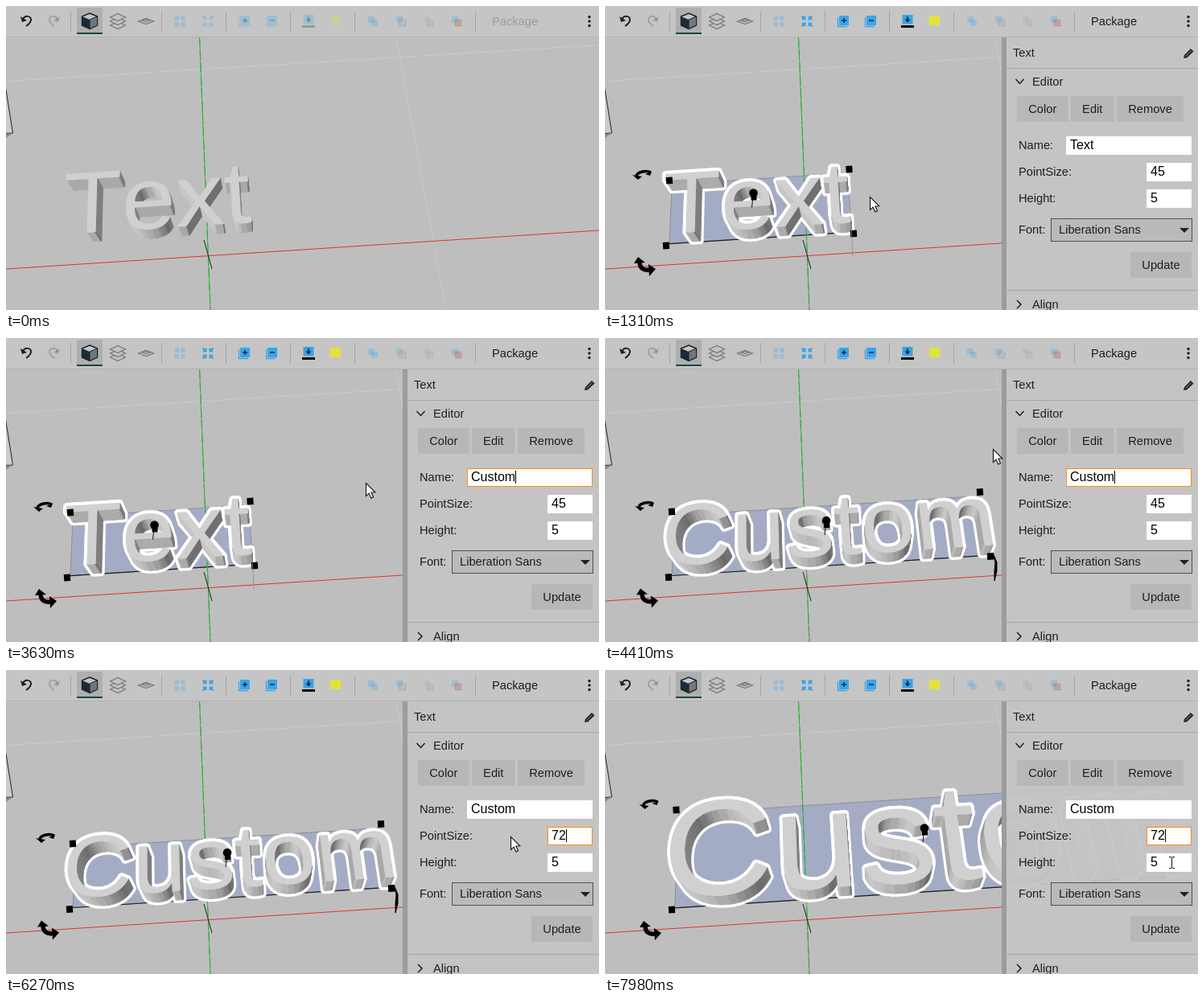
Write an HTML page with a canvas that moves like this. It is 737 px wide and 378 px high and loops after 8000 ms.

```html
<!DOCTYPE html>
<html lang="en">
<head>
<meta charset="utf-8">
<title>3D text editor</title>
<style>
html, body { margin: 0; width: 737px; height: 378px; overflow: hidden; background: #bebebe; }
canvas { display: block; }
</style>
</head>
<body>
<canvas id="stage" width="737" height="378"></canvas>
<script>
const W = 737, H = 378, LOOP = 8000, STEP = 78;
const FONT = '"Liberation Sans", Arial, sans-serif';
const INK = '#1e1e1e', BLUE = '#38a5ea', NADIR = [333, 620];
const g = document.getElementById('stage').getContext('2d');

function layer(w, h) {
  const c = document.createElement('canvas');
  c.width = w; c.height = h;
  return c.getContext('2d', { willReadFrequently: true });
}

function poly(c, pts, fill, stroke, width = 1, open) {
  c.beginPath();
  pts.forEach(([x, y], i) => i ? c.lineTo(x, y) : c.moveTo(x, y));
  if (!open) c.closePath();
  if (fill) { c.fillStyle = fill; c.fill(); }
  if (stroke) { c.strokeStyle = stroke; c.lineWidth = width; c.stroke(); }
}
const line = (c, x0, y0, x1, y1, color, width) => poly(c, [[x0, y0], [x1, y1]], null, color, width, true);
function rect(c, x0, y0, x1, y1, color) {
  c.fillStyle = color;
  c.fillRect(x0, y0, x1 - x0, y1 - y0);
}
function label(c, s, x, y, size = 14.67, color = INK) {
  c.font = `${size}px ${FONT}`;
  c.fillStyle = color;
  c.fillText(s, x, y);
}

// ---- solid lettering ----

// Ground plane in ems at 45 pt; z = 1 is the face of the letters.
function project(x, y, z) {
  const b = 0.055 * y, c = -0.033 * z, w = 1 + b + c;
  return [(251 + 120 * x + 167 * b + NADIR[0] * c) / w,
          (311 - 7.7 * x - 1720 * b + NADIR[1] * c) / w];
}

// Marching squares over rendered text; returns closed outlines in ems.
function trace(text) {
  const S = 120, pad = 6, base = 106, w = S * 4, h = 120;
  const c = layer(w, h);
  c.font = `${S}px ${FONT}`;
  c.fontKerning = 'none';
  c.fillText(text, pad, base);
  const data = c.getImageData(0, 0, w, h).data;
  const a = (x, y) => data[(y * w + x) * 4 + 3] - 127.5;
  const next = new Map(), at = new Map();
  for (let y = 0; y < h - 1; y++) for (let x = 0; x < w - 1; x++) {
    const q = [[x, y], [x + 1, y], [x + 1, y + 1], [x, y + 1]];
    const v = q.map(p => a(...p));
    if (v.every(n => n < 0) || v.every(n => n > 0)) continue;
    const id = [2 * (y * w + x), 2 * (y * w + x + 1) + 1, 2 * ((y + 1) * w + x), 2 * (y * w + x) + 1];
    for (let i = 0; i < 4; i++) {
      const n = (i + 1) % 4;
      if (v[i] > 0 || v[n] < 0) continue;
      let j = n;
      while (v[(j + 1) % 4] > 0) j = (j + 1) % 4;
      next.set(id[i], id[j]);
      const k = v[i] / (v[i] - v[n]);
      const px = q[i][0] + (q[n][0] - q[i][0]) * k + 0.5;
      const py = q[i][1] + (q[n][1] - q[i][1]) * k + 0.5;
      at.set(id[i], [(px - pad) / S, (base - py) / S]);
    }
  }
  const loops = [];
  while (next.size) {
    const loop = [];
    let k = next.keys().next().value;
    while (next.has(k)) {
      loop.push(at.get(k));
      const n = next.get(k);
      next.delete(k);
      k = n;
    }
    if (loop.length > 8) loops.push(loop);
  }
  return loops;
}

// Grey of a wall whose normal points along angle t (y up), in flat facets.
function shade(t) {
  const f = Math.PI / 20, r = Math.round(t / f) * f;
  const lit = Math.max(0, Math.cos(r + Math.PI * 0.75));
  const back = Math.max(0, Math.cos(r - Math.PI / 6));
  const v = Math.round(98 + 102 * lit + 34 * back);
  return `rgb(${v},${v},${v})`;
}

function makeSolid(text, size) {
  const em = size / 45, loops = trace(text);
  const place = (p, z) => project(-1.458 + p[0] * em, 0.246 + p[1] * em, z);
  const all = loops.flat(), xs = all.map(p => p[0]), ys = all.map(p => p[1]);
  const x0 = Math.min(...xs), x1 = Math.max(...xs), y0 = Math.min(...ys), y1 = Math.max(...ys);
  const quad = [[x0, y1], [x1, y1], [x1, y0], [x0, y0]].map(p => place(p, 0));
  const face = new Path2D(), hull = new Path2D(), walls = [];
  for (const loop of loops) {
    const n = loop.length;
    const front = loop.map(p => place(p, 1)), back = loop.map(p => place(p, 0));
    front.forEach((p, i) => i ? face.lineTo(...p) : face.moveTo(...p));
    face.closePath();
    for (let i = 0; i < n; i++) {
      const j = (i + 1) % n, s = loop[(i + n - 1) % n], e = loop[(i + 2) % n];
      const pts = [front[i], front[j], back[j], back[i]];
      pts.forEach((p, k) => k ? hull.lineTo(...p) : hull.moveTo(...p));
      hull.closePath();
      const nx = front[i][1] - front[j][1], ny = front[j][0] - front[i][0];
      if (nx * (NADIR[0] - front[i][0]) + ny * (NADIR[1] - front[i][1]) <= 0) continue;
      walls.push({
        pts,
        color: shade(Math.atan2(-(e[0] - s[0]), e[1] - s[1])),
        far: Math.hypot(front[i][0] - NADIR[0], front[i][1] - NADIR[1])
      });
    }
  }
  walls.sort((p, q) => q.far - p.far);
  return { quad, face, hull, walls };
}

function drawSolid(c, solid, outlined) {
  c.lineJoin = 'round';
  if (outlined) {
    c.strokeStyle = '#fff';
    c.lineWidth = 7.5;
    c.stroke(solid.hull);
    c.stroke(solid.face);
  }
  for (const w of solid.walls) poly(c, w.pts, w.color, w.color, 0.7);
  c.fillStyle = '#d0d0d0';
  c.fill(solid.face);
}

// ---- scene ----

function drawAxes(c) {
  line(c, 0, 327, W, 279, '#dc3434');
  line(c, 240.5, 38, 254, H, '#8f8a90');
  c.setLineDash([13, 3]);
  line(c, 240.5, 38, 254, H, '#00c80a');
  c.setLineDash([]);
  line(c, 246, 291, 256, 327, '#222');
}

function drawGround(c) {
  rect(c, 0, 0, W, H, '#bebebe');
  line(c, 0, 93.5, W, 48.5, '#c9c9c9');
  line(c, 484.5, 38, 547, H, '#c8c8c8');
  poly(c, [[-2, 92], [8.5, 158], [-2, 158.5]], '#cbcbcb', '#222');
  poly(c, [[0, 159], [8, 158.5], [0, 164]], '#8c8c8c');
}

function drawHandles(c, corners, knob) {
  for (const [x, y] of corners) {
    c.save();
    c.translate(x, y);
    c.rotate(-0.06);
    rect(c, -4, -4.3, 4, 4.3, '#000');
    c.restore();
  }
  const [kx, ky] = knob;
  line(c, kx, ky, kx - 2, ky + 18, '#111');
  c.fillStyle = '#000';
  c.beginPath();
  c.arc(kx, ky, 5.3, 0, 7);
  c.fill();
  rect(c, kx - 3, ky + 2, kx + 4, ky + 9, '#000');

  const [tx, ty] = corners[0], [bx, by] = corners[1];
  c.save();
  c.translate(tx - 34, ty - 7);
  c.lineWidth = 3.6;
  c.strokeStyle = '#000';
  c.beginPath();
  c.moveTo(11, -3);
  c.bezierCurveTo(5, -6, -5, -4, -7, 1);
  c.stroke();
  poly(c, [[-12, 0], [0, 2], [-5, 6]], '#000');
  poly(c, [[4, -1], [12, -4], [10, 1]], '#000');
  c.restore();
  c.save();
  c.translate(bx - 26, by + 26);
  c.lineWidth = 5.5;
  c.strokeStyle = '#000';
  c.beginPath();
  c.moveTo(-7, -6);
  c.bezierCurveTo(-7, 2, -2, 5, 5, 4);
  c.stroke();
  poly(c, [[-14, -4], [-9, -12], [0, -5]], '#000');
  poly(c, [[4, -3], [13, 3], [5, 12]], '#000');
  c.restore();
}

function makeScene(solid, corners, knob) {
  const c = layer(W, H);
  drawGround(c);
  if (corners) {
    const q = solid.quad;
    poly(c, q, '#a4acc5', '#8b8f9c');
    line(c, ...q[3], ...q[2], '#1c1c1c', 1.2);
  }
  drawAxes(c);
  drawSolid(c, solid, !!corners);
  if (corners) drawHandles(c, corners, knob);
  return c;
}

const shortText = makeSolid('Text', 45);
const scenes = {
  idle: makeScene(shortText),
  picked: makeScene(shortText, [[80, 217], [76, 298], [303.5, 203], [309, 283]], [184.5, 232.5]),
  renamed: makeScene(makeSolid('Custom', 45), [[83, 216], [79, 297.5], [466, 191.5], [479, 271.5]], [275, 227]),
  enlarged: makeScene(makeSolid('Custom', 72), [[88.5, 174], [83, 298]], [397, 196.5])
};
line(scenes.picked, 306, 270, 308, 312, '#8d8d8d', 0.8);
poly(scenes.renamed, [[482, 267], [487, 279], [487, 290], [484, 302], [484, 290], [485, 279]], '#000', '#000');

// ---- toolbar ----

function arrowBack(c, x, dir) {
  c.save();
  c.translate(x, 18);
  c.scale(dir, 1);
  c.strokeStyle = INK;
  c.lineWidth = 2;
  c.beginPath();
  c.moveTo(-4, -1);
  c.bezierCurveTo(-2, -7, 6, -6, 6, -1);
  c.bezierCurveTo(6, 3, 3, 5, 0, 7);
  c.stroke();
  poly(c, [[-7, -5], [-5, 2], [1, 0]], INK);
  c.restore();
}

function rhomb(c, x, y, rx, ry) {
  poly(c, [[x - rx, y], [x, y - ry], [x + rx, y], [x, y + ry]], '#c2c2c2', '#777', 1.2);
}

function makeBar(active) {
  const c = layer(W, 39);
  const on = active ? 1 : 0.28;
  const fade = (alpha, draw) => { c.globalAlpha = alpha; draw(); c.globalAlpha = 1; };
  rect(c, 0, 0, W, 38, '#c5c5c5');
  rect(c, 0, 38, W, 39, '#b2b2b2');
  for (const x of [80, 193, 273, 353, 433, 583]) rect(c, x, 6, x + 1, 32, '#a6a6a6');
  arrowBack(c, 25, 1);
  fade(0.22, () => arrowBack(c, 60, -1));

  rect(c, 88, 2, 120, 33, '#afafaf');
  rect(c, 88, 33, 120, 35, '#174a3c');
  poly(c, [[104, 9], [113.5, 13], [113.5, 24], [104, 28.5], [94.5, 24], [94.5, 13]], '#c2c5c8', '#17212b', 1.4);
  poly(c, [[94.5, 13], [104, 17], [104, 28.5], [94.5, 24]], '#1d2a38');
  poly(c, [[104, 17], [113.5, 13], [113.5, 24], [104, 28.5]], '#71777d', '#17212b');

  for (const y of [24, 19, 14]) rhomb(c, 139, y, 9.5, 4.5);
  rhomb(c, 174, 19, 9.5, 3.5);
  rhomb(c, 174, 18, 4.5, 1.5);

  const tiles = (x, r) => {
    for (const dx of [-1, 1]) for (const dy of [-1, 1])
      rect(c, x + dx * 3.8 - r, 19 + dy * 3.8 - r, x + dx * 3.8 + r, 19 + dy * 3.8 + r, BLUE);
  };
  fade(0.3, () => tiles(216, 2.8));
  fade(on, () => {
    tiles(251, 2.3);
    for (const dx of [-6, 6]) for (const dy of [-6, 6]) rect(c, 250.5 + dx, 18.5 + dy, 251.5 + dx, 19.5 + dy, '#444');
    for (const x of [296, 330]) {
      poly(c, [[x - 6.5, 14], [x - 6.5, 25.5], [x + 5, 25.5]], null, BLUE, 1.3, true);
      rect(c, x - 5, 12, x + 7, 24, BLUE);
      rect(c, x - 2, 17.3, x + 4, 18.7, '#123');
    }
    rect(c, 296.3, 15, 297.7, 21, '#123');
    rect(c, 369.5, 11, 382.5, 22.5, BLUE);
    line(c, 376, 13, 376, 18, '#123', 1.6);
    poly(c, [[372.5, 16.5], [379.5, 16.5], [376, 20.5]], '#123');
    rect(c, 403, 12, 416, 24, '#e2e23c');
  });
  rect(c, 368, 24, 384, 27, active ? '#000' : '#8fa08e');

  fade(0.28, () => {
    [456, 491, 525, 560].forEach((x, i) => {
      rect(c, x - 6, 13, x + 2, 21, i === 2 ? '#aaa' : BLUE);
      rect(c, x - 2, 17, x + 6, 25, i === 3 ? '#d8442a' : i ? '#a0a8ae' : BLUE);
      if (i) poly(c, [[x - 2, 17], [x + 6, 17], [x + 6, 25], [x - 2, 25]], null, i === 2 ? '#b96' : '#678');
    });
  });

  label(c, 'Package', 604, 24, 14.67, active ? INK : '#9b9b9b');
  c.fillStyle = INK;
  for (const y of [13.5, 19, 24.5]) { c.beginPath(); c.arc(725, y, 1.7, 0, 7); c.fill(); }
  return c;
}
const bars = [makeBar(false), makeBar(true)];

// ---- side panel ----

const FIELDS = { name: [573, 162, 729, 185], size: [673, 195, 729, 218], height: [673, 228, 729, 251] };

function button(text, x0, y0, x1, y1) {
  rect(g, x0, y0, x1, y1, '#b7b7b7');
  g.textAlign = 'center';
  label(g, text, (x0 + x1) / 2, y0 + 21);
  g.textAlign = 'left';
}

function field(id, text, s) {
  const [x0, y0, x1, y1] = FIELDS[id];
  rect(g, x0, y0, x1, y1, '#fff');
  g.font = `16px ${FONT}`;
  const w = g.measureText(text).width, focused = s.focus === id;
  if (focused) {
    g.strokeStyle = '#ff8a14';
    g.lineWidth = 1;
    g.strokeRect(x0 + 0.5, y0 + 0.5, x1 - x0 - 1, y1 - y0 - 1);
    if (s.selected) rect(g, x0 + 4, y0 + 3, x0 + 5 + w, y0 + 19, '#808080');
  }
  label(g, text, x0 + 5, y0 + 16, 16, '#000');
  if (focused && s.caret) {
    const cx = s.selected ? x0 + 4 : Math.round(x0 + 5 + w);
    rect(g, cx, y0 + 3, cx + 1, y0 + 19, '#000');
  }
}

function drawPanel(s) {
  rect(g, 493, 39, 499, H, '#9c9c9c');
  rect(g, 499, 39, W, H, 'rgba(196,196,196,0.95)');
  label(g, 'Text', 507, 63);
  poly(g, [[719, 65], [720, 61], [728, 53], [731.5, 56.5], [723, 64.5]], '#222');
  line(g, 721.5, 62.5, 728.5, 55.8, '#bbb', 0.8);
  rect(g, 499, 77, W, 78, '#a4a4a4');
  poly(g, [[510.5, 91], [515.5, 96.5], [520.5, 91]], null, INK, 1.5, true);
  label(g, 'Editor', 531, 99);
  button('Color', 512, 112, 575.5, 144);
  button('Edit', 579, 112, 632.5, 144);
  button('Remove', 636, 112, 719, 144);
  label(g, 'Name:', 514, 178);
  label(g, 'PointSize:', 514, 211);
  label(g, 'Height:', 514, 244);
  label(g, 'Font:', 514, 283);
  field('name', s.name, s);
  field('size', s.size, s);
  field('height', '5', s);
  rect(g, 554, 264, 730, 293, '#bababa');
  g.strokeStyle = '#505050';
  g.lineWidth = 1;
  g.strokeRect(554.5, 264.5, 175, 28);
  label(g, 'Liberation Sans', 564, 283);
  poly(g, [[714, 276], [726, 276], [720, 282]], '#222');
  button('Update', 653, 306, 729, 338);
  rect(g, 499, 353, W, 354, '#a4a4a4');
  poly(g, [[512, 366], [517, 371], [512, 376]], null, INK, 1.5, true);
  label(g, 'Align', 531, 376);
}

// ---- timeline ----

const PATH = [
  [130, 464, 338], [290, 380, 288], [450, 300, 260], [600, 268, 250], [680, 291, 246],
  [832, 291, 246], [990, 285, 246], [1232, 285, 246], [1470, 420, 218], [1700, 580, 188],
  [1930, 638, 178], [2010, 566, 171], [2090, 484, 165], [2160, 434, 163], [2240, 421, 170],
  [2330, 447, 180], [4252, 447, 180], [4490, 500, 116], [4640, 590, 140], [4860, 690, 192],
  [5010, 704, 212], [5090, 697, 207], [5170, 650, 202], [5250, 624, 203], [5320, 620, 206],
  [5400, 627, 207], [7190, 627, 207], [7200, 627, 208], [7272, 627, 208], [7500, 650, 200],
  [7740, 698, 222], [7900, 711, 236], [7980, 704, 239], [8000, 704, 239]
];
const TYPED = [[3020, 1], [3170, 2], [3250, 3], [3480, 4], [3560, 5], [3630, 6]];
const between = (t, a, b) => t >= a && t < b;

function pointer(t) {
  let i = 0;
  while (i < PATH.length - 2 && PATH[i + 1][0] <= t) i++;
  const [t0, x0, y0] = PATH[i], [t1, x1, y1] = PATH[i + 1];
  const k = Math.floor((t - t0) / STEP) * STEP / (t1 - t0);
  return [Math.round(x0 + (x1 - x0) * k), Math.round(y0 + (y1 - y0) * k)];
}

function state(t) {
  const typed = TYPED.filter(([at]) => t >= at).length;
  return {
    scene: t < 1140 ? 'idle' : t < 3880 ? 'picked' : t < 6570 ? 'renamed' : 'enlarged',
    name: typed ? 'Custom'.slice(0, TYPED[typed - 1][1]) : 'Text',
    size: t < 6100 ? '45' : t < 6270 ? '7' : '72',
    focus: t < 2010 ? '' : t < 5010 ? 'name' : 'size',
    selected: between(t, 2010, 3020) || between(t, 5170, 6100),
    caret: !between(t, 2620, 2860) && !between(t, 5720, 6100)
  };
}

function drawPointer(t) {
  if (t < 130) return;
  const [x, y] = pointer(t);
  const over = Object.values(FIELDS).some(([x0, y0, x1, y1]) => x >= x0 && x < x1 && y >= y0 && y < y1);
  const drag = between(t, 1930, 2330) || between(t, 5090, 5400);
  if (t >= 1140 && (over || drag)) {
    line(g, x + 0.5, y - 6, x + 0.5, y + 7, '#222', 1.2);
    for (const dy of [-7, 7]) {
      line(g, x - 3, y + dy + 0.5, x, y + dy + 0.5, '#222');
      line(g, x + 1, y + dy + 0.5, x + 4, y + dy + 0.5, '#222');
    }
    return;
  }
  const shape = [[0, 0], [0, 16], [3.6, 12.6], [6.3, 18.5], [9, 17.3], [6.4, 11.5], [11.3, 11.3]];
  poly(g, shape.map(([dx, dy]) => [x + dx + 0.5, y + dy + 0.5]), '#fff', '#111', 1.1);
}

function draw(t) {
  const s = state(t), active = t >= 1140;
  g.drawImage(scenes[s.scene].canvas, 0, 0);
  if (active) drawPanel(s);
  g.drawImage(bars[+active].canvas, 0, 0);
  drawPointer(t);
}

const start = performance.now();
function tick() {
  draw((performance.now() - start) % LOOP);
  requestAnimationFrame(tick);
}
tick();
</script>
</body>
</html>
```
